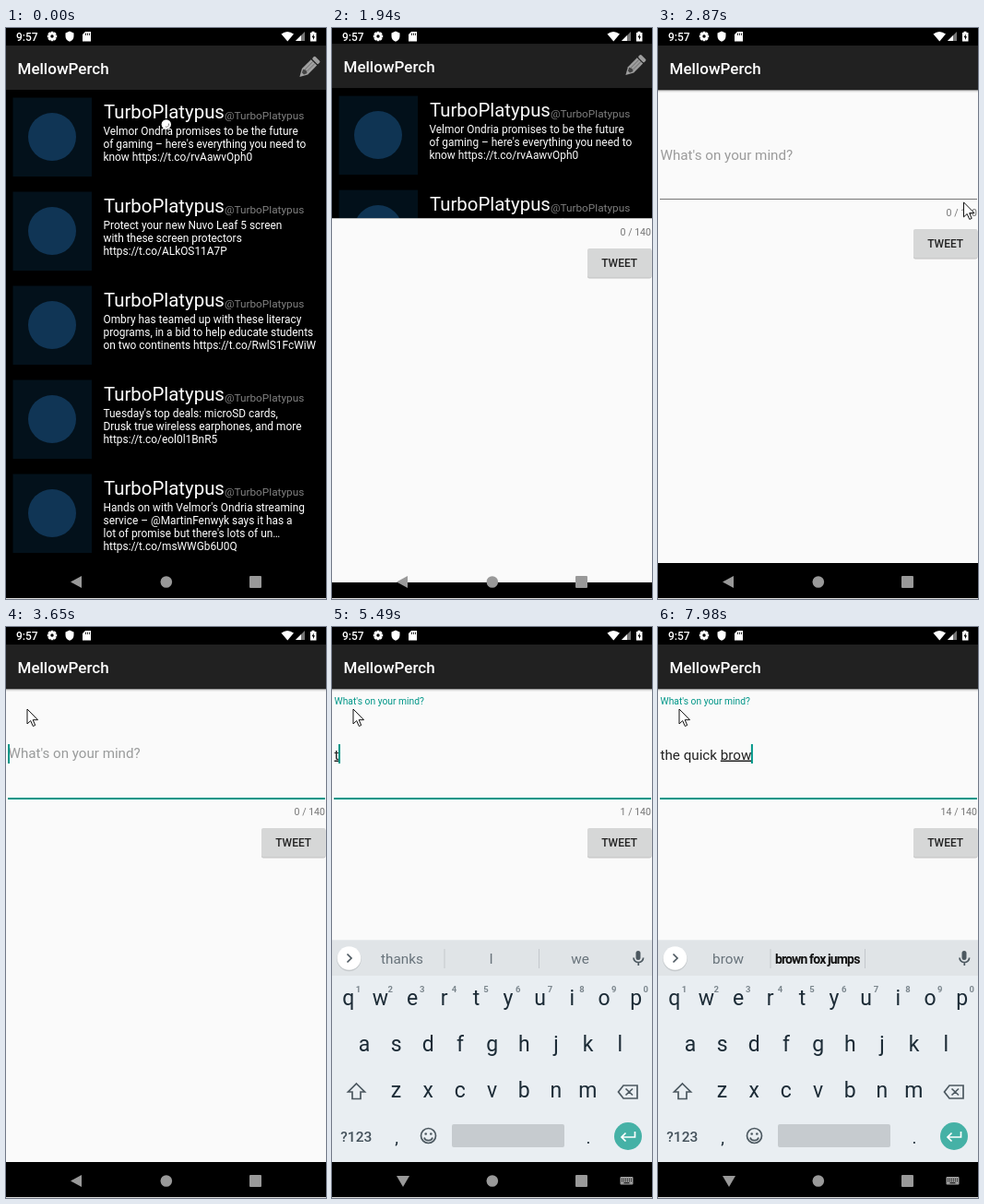
An HTML page for the animation above (8000 ms loop, 347 by 619 pixels).

```html
<!DOCTYPE html>
<html lang="en">
<head>
<meta charset="utf-8">
<title>Compose screen</title>
<style>
  html, body { margin: 0; width: 100%; height: 100%; overflow: hidden; background: #000; }
  svg { display: block; width: 347px; height: 619px; }
  text { font-family: Roboto, sans-serif; white-space: pre; }
  .mid { text-anchor: middle; }
  .end { text-anchor: end; }
  .bold { font-weight: 500; }
  .line { fill: none; stroke: #4c5860; stroke-width: 1.7; }
</style>
</head>
<body>
<svg id="stage" viewBox="0 0 347 619"></svg>
<script>
const APP = "MellowPerch", AUTHOR = "TurboPlatypus", HINT = "What's on your mind?";
const POSTS = [
  ["Velmor Ondria promises to be the future", "of gaming – here's everything you need to", "know https://t.co/rvAawvOph0"],
  ["Protect your new Nuvo Leaf 5 screen", "with these screen protectors", "https://t.co/ALkOS11A7P"],
  ["Ombry has teamed up with these literacy", "programs, in a bid to help educate students", "on two continents https://t.co/RwlS1FcWiW"],
  ["Tuesday's top deals: microSD cards,", "Drusk true wireless earphones, and more", "https://t.co/eol0l1BnR5"],
  ["Hands on with Velmor's Ondria streaming", "service – @MartinFenwyk says it has a", "lot of promise but there's lots of un…", "https://t.co/msWWGb6U0Q"],
];
const TYPED = "the quick brow";
const KEY_TIMES = [5490, 5610, 5670, 5790, 5850, 5960, 6140, 6200, 6320, 6380, 6690, 7310, 7500, 7740];
const SUGGESTIONS = [
  [0, "thanks", "I", "we"], [5550, "t", "the", "to"], [5730, "the", "they", "then"],
  [5850, "first", "same", "best"], [5960, "qu", "quick", "quite"], [6200, "quick", "quickly", "quit"],
  [6380, "and", "one", "way"], [6690, "b", "but", "by"], [7310, "br", "bring", "brown"],
  [7500, "bro", "brown", "broke"], [7800, "brow", "brown fox jumps", ""],
];

const text = (x, y, size, fill, str, more = "") =>
  `<text x="${x}" y="${y}" font-size="${size}" fill="${fill}" ${more}>${str}</text>`;
const rect = (x, y, w, h, fill, more = "") =>
  `<rect x="${x}" y="${y}" width="${w}" height="${h}" fill="${fill}" ${more}/>`;
const circle = (x, y, r, fill, more = "") => `<circle cx="${x}" cy="${y}" r="${r}" fill="${fill}" ${more}/>`;
const path = (d, fill, more = "") => `<path d="${d}" fill="${fill}" ${more}/>`;
const stroke = (d, more = "") => `<path d="${d}" class="line" ${more}/>`;

const toolbar = () => rect(0, -30, 347, 49, "#000") + rect(0, 19, 347, 48, "#212121") +
  text(12.5, 50, 17, "#fff", APP, 'class="bold"');

const pencil = `<g transform="translate(328.3 43) rotate(45)" fill="#a0a0a0">
  <path d="M-4.5-8H4.5V6L0 14L-4.5 6Z"/><rect x="-4.5" y="-13.5" width="9" height="4.3" rx="1.5"/>
  <path d="M-1.5-8V5M1.5-8V5" stroke="#666" stroke-width=".8"/>
  <path d="M-3 5.500L0 4L3 5.500L1.500 9H-1.500Z" fill="#444"/></g>`;

const post = (lines, i) => `<g transform="translate(0 ${i * 102})">` +
  rect(7.5, 75.5, 85.5, 85.5, "#03111b") + circle(50, 118, 26, "#103555") +
  text(106, 97.5, 20.4, "#fff", `${AUTHOR}<tspan font-size="11.8" fill="#808080" dy="1.5">@${AUTHOR}</tspan>`) +
  lines.map((line, n) => text(105.5, 116 + 14 * n, 11.9, "#fff", line)).join("") + "</g>";

const keyRow = (letters, x, y) => [...letters].map((c, i) =>
  text(x + i * 34.65, y, 23, "#1c2b36", c, 'class="mid"')).join("");

const keyboard = rect(0, 339.5, 347, 240.5, "#e9eef2") + rect(0, 339.5, 347, 38.5, "#e0e4e7") +
  circle(18.5, 360, 13.2, "#c6cacd") + circle(18.5, 359, 12.8, "#fff") + stroke("M16.5 354.5L21 359L16.5 363.5") +
  [76, 172.7, 269].map(x => text(x, 364.5, 15.3, "#68737b", "", 'class="mid word"')).join("") +
  rect(121.5, 349, 1, 21, "#c3c8cc") + rect(224, 349, 1, 21, "#c3c8cc") +
  rect(329.5, 351, 5, 10, "#4c5860", 'rx="2.5"') + stroke("M327 358.5a5.3 5 0 0 0 10.6 0M332.3 363.5V367") +
  keyRow("qwertyuiop", 17.8, 410) + keyRow("asdfghjkl", 35, 460) + keyRow("zxcvbnm", 69.5, 510) +
  [..."1234567890"].map((c, i) => text(28.5 + i * 34.65, 396, 9.5, "#7b868d", c, 'class="mid" font-weight="700"')).join("") +
  stroke("M26.5 495L35.5 504H31V511.5H22V504H17.5Z") +
  stroke("M316 497H331V511H316L310.5 504ZM318.5 500.5L326 507.5M326 500.5L318.5 507.5") +
  text(26.3, 557.5, 15.5, "#43505a", "?123", 'class="mid bold"') +
  text(70, 560, 19, "#1c2b36", ",", 'class="mid"') + text(278, 560, 19, "#1c2b36", ".", 'class="mid"') +
  circle(104.5, 551.5, 8, "none", 'class="line"') + circle(101.7, 549.5, 1.3, "#4c5860") +
  circle(107.3, 549.5, 1.3, "#4c5860") + stroke("M100 553.5a4.6 4 0 0 0 9 0") +
  rect(130, 539, 122, 25, "#c6cbcf", 'rx="2"') + circle(321, 552, 15, "#45b1a6") +
  stroke("M328.5 547V553H314.5M318.5 548.5L314 553L318.5 557.5", 'style="stroke:#fff"');

const compose = rect(0, 19, 347, 561, "#fafafa") + toolbar() +
  rect(0, 67, 347, 1, "#999") + rect(0, 68, 347, 1, "#ddd") + rect(0, 69, 347, 1, "#f0f0f0") +
  text(2.5, 142.5, 15.2, "#9b9b9b", HINT, 'id="hint"') + text(2.5, 143.5, 15.2, "#222", "", 'id="entry"') +
  rect(2, 127, 2, 21, "#009688", 'id="caret"') + rect(2, 185, 344, 1, "#757575", 'id="rule"') +
  text(346, 203.8, 10.6, "#757575", "", 'id="counter" class="end"') +
  rect(277, 219, 69.5, 31.5, "#c2c2c2", 'rx="2"') + rect(277, 218, 69.5, 31.5, "#d6d7d7", 'rx="2"') +
  text(311.7, 238.3, 12, "#222", "TWEET", 'class="mid bold"');

const gearTeeth = [0, 45, 90, 135].map(a => rect(48.6, 3.8, 2.8, 10.4, "#fff", `transform="rotate(${a} 50 9)"`)).join("");
const status = text(11, 13.5, 12, "#fff", "9:57", 'class="bold"') +
  gearTeeth + circle(50, 9, 3.9, "#fff") + circle(50, 9, 1.7, "#000") +
  path("M69 3.5L73.5 5.5V9Q73.5 13 69 14.8Q64.5 13 64.5 9V5.5Z", "#fff") +
  path("M86 4H92V14.5H83V7Z", "#fff") + path("M86.5 5.5V8M88.5 5.5V8M90.5 5.5V8", "none", 'stroke="#000" stroke-width=".8"') +
  path("M298.5 6.5Q305 1.5 312 6.5L305.3 14.5Z", "#fff") +
  path("M324 4V14H314Z", "#777") + path("M320 8V14H314Z", "#fff") +
  path("M330 5H331.5V3.8H334.5V5H336.5V14.5H330Z", "#fff") + path("M333.7 6.5L331.6 10.2H333V13L335 9.2H333.7Z", "#000");

const nav = path("", "#999", 'id="back"') + circle(173.8, 600.5, 6.3, "#999") +
  rect(264, 594, 13, 13, "#999", 'rx="1"') +
  `<g id="imeIcon">${rect(312.5, 596, 14, 8.5, "#999", 'rx="1"')}${
    path("M314 598.5H325.5M314 600.5H325.5", "none", 'stroke="#000" stroke-dasharray="1 1"')}${
    path("M316.5 602.7H322.5", "none", 'stroke="#000"')}</g>`;

document.getElementById("stage").innerHTML =
  `<clipPath id="reveal"><rect id="revealBox" width="347" height="619"/></clipPath>` +
  rect(0, 0, 347, 619, "#000") +
  `<g id="list">${toolbar()}${circle(328.5, 43.5, 0, "#4a4a4a", 'id="ripple"')}${pencil}${POSTS.map(post).join("")}</g>` +
  `<g id="compose" clip-path="url(#reveal)">${compose}</g><g id="keyboard">${keyboard}</g>` + status + nav +
  rect(0, 618, 347, 1, "#ddd") +
  `<g id="busy">${circle(0, 0, 5.2, "#fff")}${path("M-1 2.5A2.6 2.6 0 0 0 2.5-1", "none", 'stroke="#888"')}</g>` +
  path("M0 0V16L3.7 12.6L6.3 18.5L8.7 17.5L6.2 11.7H11.5Z", "#fff", 'id="pointer" stroke="#111" stroke-linejoin="round"');

const $ = id => document.getElementById(id);
const words = document.querySelectorAll(".word");
const lerp = (a, b, p) => a + (b - a) * p;
const span = (t, from, to) => Math.min(1, Math.max(0, (t - from) / (to - from)));
const show = (id, on) => $(id).style.display = on ? "" : "none";
const set = (id, attrs) => { for (const k in attrs) $(id).setAttribute(k, attrs[k]); };
const move = (id, x, y) => set(id, { transform: `translate(${x} ${y})` });

// y of a cubic Bezier at a given x, by bisection
function bezier(x, x0, y0, x1, y1, x2, y2, x3, y3) {
  const at = (a, b, c, d, s) => a * (1 - s) ** 3 + 3 * b * s * (1 - s) ** 2 + 3 * c * s * s * (1 - s) + d * s ** 3;
  let lo = 0, hi = 1;
  for (let i = 0; i < 24; i++) {
    const s = (lo + hi) / 2;
    if (at(x0, x1, x2, x3, s) < x) lo = s; else hi = s;
  }
  return at(y0, y1, y2, y3, lo);
}
const fastOutSlowIn = p => bezier(p, 0, 0, .4, 0, .2, 1, 1, 1);
const extraSlowIn = p => p < 1 / 6
  ? bezier(p, 0, 0, .05, 0, .1333, .06, 1 / 6, .4)
  : bezier(p, 1 / 6, .4, .2083, .82, .25, 1, 1, 1);

const POINTER = [[720, 334, 47], [780, 314, 41], [1030, 314, 41], [1150, 325, 42],
  [2870, 332, 189], [3290, 119, 149], [3470, 119, 149], [3640, 23, 89], [8000, 23, 89]];

function drawPointers(t) {
  const p = span(t, 60, 400);
  show("busy", t < 420);
  move("busy", lerp(173.8, 9, p), lerp(104.5, 390, p));
  const i = POINTER.findIndex(k => k[0] > t);
  const visible = t >= 720 && t < 1150 || t >= 2870;
  show("pointer", visible);
  if (!visible) return;
  const [a, b] = [POINTER[i - 1], POINTER[i]], q = span(t, a[0], b[0]);
  move("pointer", lerp(a[1], b[1], q), lerp(a[2], b[2], q));
}

function drawScreens(t) {
  const p = span(t, 1850, 2275), slide = fastOutSlowIn(p), ripple = span(t, 1440, 1690);
  show("ripple", ripple > 0 && t < 1940);
  set("ripple", { r: lerp(6, 17.5, ripple), opacity: lerp(.4, 1, ripple) });
  show("list", p < 1);
  show("compose", p > 0);
  move("list", 0, -12 * slide);
  set("list", { opacity: 1 - .1 * slide });
  move("compose", 0, 25 * (1 - slide));
  set("revealBox", { y: 594 * (1 - extraSlowIn(p)) });
}

function drawEntry(t) {
  const focused = t >= 3640, up = fastOutSlowIn(span(t, 3640, 3807));
  set("hint", { y: lerp(142.5, 83.5, up), "font-size": lerp(15.2, 10.3, up) });
  $("hint").style.fill = `color-mix(in srgb, #009688 ${up * 100}%, #9b9b9b)`;
  set("rule", { height: focused ? 2 : 1, fill: focused ? "#009688" : t < 2275 ? "#b4b4b4" : "#757575" });

  const count = KEY_TIMES.filter(k => k <= t).length, typed = TYPED.slice(0, count);
  const start = typed.lastIndexOf(" ") + 1;
  $("entry").innerHTML = typed.slice(0, start) + `<tspan text-decoration="underline">${typed.slice(start)}</tspan>`;
  $("counter").textContent = `${count} / 140`;
  const lastKey = count ? KEY_TIMES[count - 1] : 3990;
  show("caret", focused && Math.trunc((t - lastKey) / 500) % 2 === 0);
  set("caret", { x: 2 + (count && $("entry").getComputedTextLength()) });
}

function drawKeyboard(t) {
  const rise = 1 - (1 - span(t, 3712, 3965)) ** 2, open = rise > 0;
  show("keyboard", open);
  show("imeIcon", open);
  move("keyboard", 0, 28 * (1 - rise));
  set("keyboard", { opacity: rise });
  set("back", { d: open ? "M70 595H84L77 607Z" : "M70 600.5L82 594V607Z" });
  const row = SUGGESTIONS.filter(s => s[0] <= t).pop();
  words.forEach((w, i) => {
    const best = row[i + 1].includes(" ");
    w.textContent = row[i + 1];
    w.style = best ? "font-weight:700;font-size:14px;letter-spacing:-.85px;fill:#111" : "";
  });
}

function frame() {
  const t = performance.now() % 8000;
  drawPointers(t);
  drawScreens(t);
  drawEntry(t);
  drawKeyboard(t);
  requestAnimationFrame(frame);
}
frame();
</script>
</body>
</html>
```
